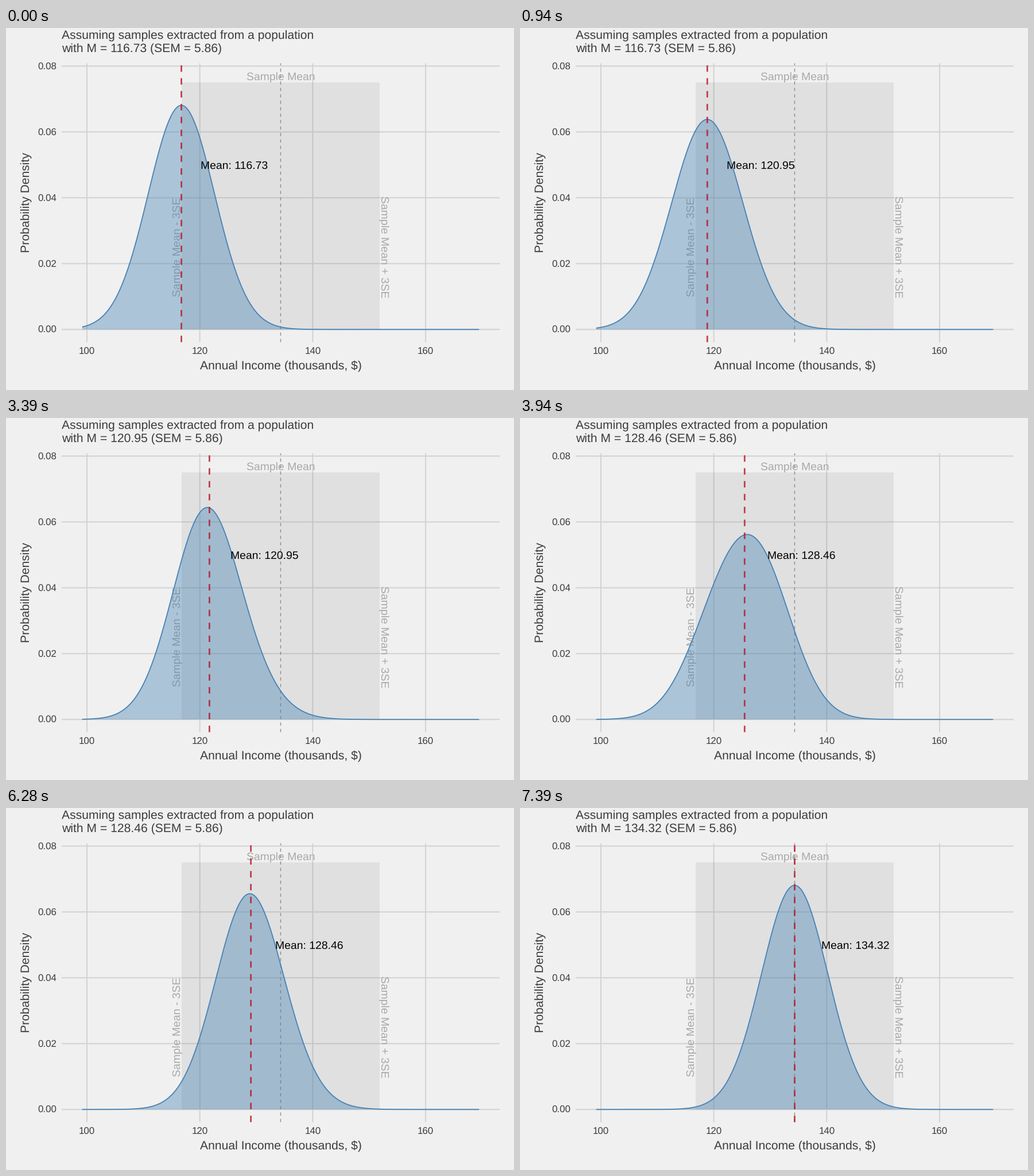
Write a matplotlib script that moves like this. It is 885 by 632 pixels and loops after 8000 ms.

```python
import numpy as np
import matplotlib.pyplot as plt
from matplotlib.animation import FuncAnimation

W, H, DPI = 885, 632, 100
LOOP, TICK = 8000, 40
plt.rcParams["font.family"] = "Liberation Sans"
plt.rcParams["text.hinting"] = "no_hinting"

SE = 5.86
MEANS = [116.73, 120.95, 128.46, 134.32]
STARTS = [500, 3390, 6280]      # ms at which each move begins
STEP, STEPS = 111, 10           # ms per step, steps per move
CENTER = MEANS[-1]

BG, GRID, INK = "#f0f0f0", "#d2d2d2", "#3c3c3c"
NOTE, BLUE, RED = "#a9a9a9", "#4682b4", "#b2182b"
DASH = (0, (4, 4))


def px(x):
    return 141 + (x - 100) * 9.8333


def py(y):
    return 526.3 - y * 5747.5


def pt(pixels):
    return pixels * 72 / DPI


def density(x, mean):
    return np.exp(-((x - mean) / SE) ** 2 / 2) / (SE * np.sqrt(2 * np.pi))


LEFT, RIGHT = 97, 860
TOP, BOTTOM = py(0.077 * 1.05), py(-0.077 * 0.05)

fig = plt.figure(figsize=(W / DPI, H / DPI), dpi=DPI, facecolor=BG)
ax = fig.add_axes([0, 0, 1, 1])
ax.set_xlim(0, W)
ax.set_ylim(H, 0)
ax.axis("off")


def line(xs, ys, color, width, z, **kw):
    return ax.plot(xs, ys, color=color, lw=pt(width), zorder=z, snap=False,
                   solid_capstyle="butt", **kw)[0]


def label(x, y, s, size, color=INK, ha="center", rot=0, z=3):
    return ax.text(x, y, s, fontsize=pt(size), color=color, ha=ha, va="baseline",
                   rotation=rot, rotation_mode="anchor", zorder=z)


# Grid and axis labels
for v in (0, 0.02, 0.04, 0.06, 0.08):
    line([LEFT, RIGHT], [py(v)] * 2, GRID, 2, 1)
    label(88, py(v) + 6, f"{v:.2f}", 16.9, ha="right")
for v in (100, 120, 140, 160):
    line([px(v)] * 2, [TOP, BOTTOM], GRID, 2, 1)
    label(px(v), 570.3, str(v), 16.9)
label(478.5, 596, "Annual Income (thousands, $)", 21.2)
label(41, 304.8, "Probability Density", 21.2, rot=90)
label(97, 18.4, "Assuming samples extracted from a population", 21.2, ha="left")
title = label(97, 41.2, "", 21.2, ha="left")

# Three standard errors around the sample mean
low, high = px(CENTER - 3 * SE), px(CENTER + 3 * SE)
ax.fill([low, high, high, low], [py(0.075)] * 2 + [py(0)] * 2,
        color="#595959", alpha=0.1, lw=0, zorder=2)
label(px(CENTER), 90.8, "Sample Mean", 19.35, NOTE)
label(304, py(0.025), "Sample Mean - 3SE", 19.35, NOTE, rot=90)
label(652.9, py(0.025), "Sample Mean + 3SE", 19.35, NOTE, rot=270)
line([px(CENTER)] * 2, [BOTTOM, TOP], "#8c8c8c", 1.405, 4, ls=DASH)

# Moving parts
xs = np.linspace(CENTER - 6 * SE, CENTER + 6 * SE, 500)
area = ax.fill([0, 1, 1], [0, 0, 1], color=BLUE, alpha=0.4, lw=0, zorder=5)[0]
curve = line([], [], BLUE, 1.8, 6)
marker = line([], [], RED, 2.81, 7, ls=DASH, alpha=0.8)
mean_text = label(0, 246, "", 19.35, "black", z=8)


def state(t):
    """Means moved from and to, and the share of the way done."""
    a, b, p = MEANS[0], MEANS[0], 0
    for i, start in enumerate(STARTS):
        if t >= start:
            a, b = MEANS[i], MEANS[i + 1]
            p = min(1, ((t - start) // STEP + 1) / STEPS)
    return a, b, p


def draw(n):
    a, b, p = state((n + 1) * TICK - 1)
    mean = a + (b - a) * p
    ys = py((1 - p) * density(xs, a) + p * density(xs, b))
    curve.set_data(px(xs), ys)
    outline = np.column_stack([px(xs), ys])
    ends = [[px(xs[-1]), py(0)], [px(xs[0]), py(0)]]
    area.set_xy(np.vstack([outline, ends]))
    marker.set_data([px(mean)] * 2, [BOTTOM, TOP])
    mean_text.set_x(px(mean * 1.08))
    mean_text.set_text(f"Mean: {b if p >= 0.5 else a:.2f}")
    title.set_text(f"with M = {b if p > 0.5 else a:.2f} (SEM = {SE})")
    return area, curve, marker, mean_text, title


anim = FuncAnimation(fig, draw, frames=LOOP // TICK, interval=TICK,
                     repeat=True, repeat_delay=0, blit=False)
plt.show()
```
